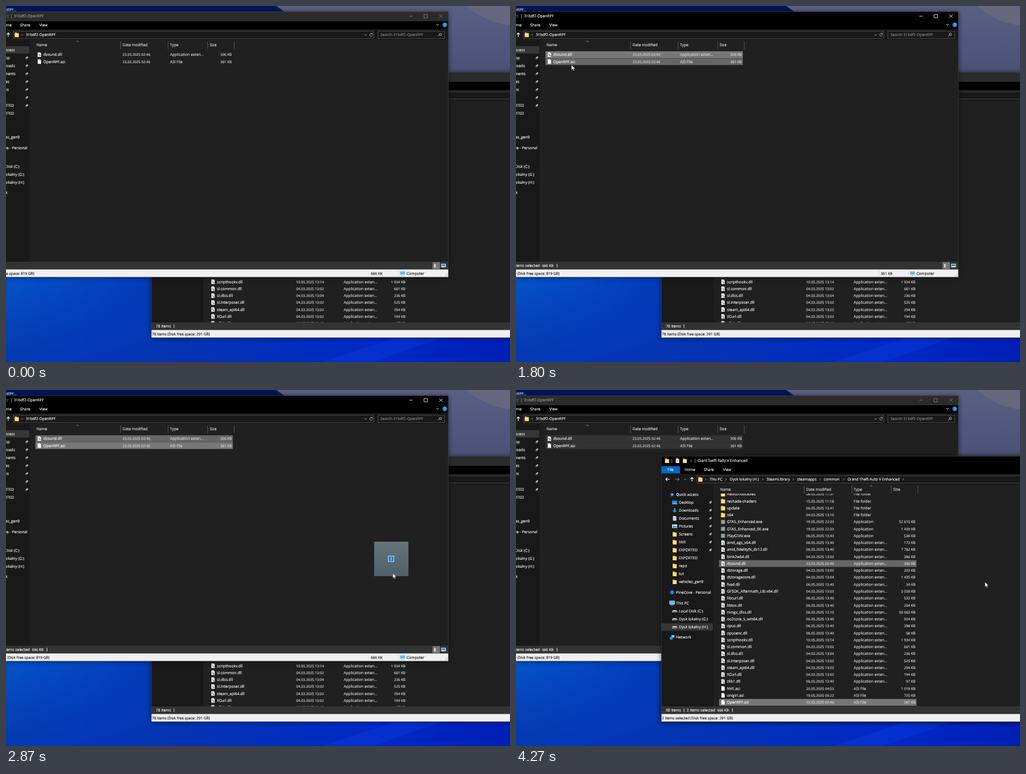
Animation of 891 by 629 pixels, one loop 5670 ms. Source, as an HTML page:

```html
<!DOCTYPE html>
<html lang="en">
<head>
<meta charset="utf-8">
<title>Copying files</title>
<style>
html, body { margin: 0; width: 100%; height: 100%; overflow: hidden; background: #0435b8; }
svg { display: block; width: 891px; height: 629px; font-family: "Open Sans", "Noto Sans", sans-serif; text-rendering: geometricPrecision; }
text { fill: currentColor; stroke: currentColor; stroke-width: .14px; }
</style>
</head>
<body>
<svg id="stage" viewBox="0 0 891 629" xmlns="http://www.w3.org/2000/svg">
  <defs>
    <linearGradient id="sky" x1="0" y1="0" x2="0" y2="1">
      <stop offset="0" stop-color="#00165a"/><stop offset=".5" stop-color="#0338a4"/>
      <stop offset=".77" stop-color="#0452c6"/><stop offset="1" stop-color="#0438ae"/>
    </linearGradient>
    <linearGradient id="deep" x1="0" y1="0" x2="1" y2="0">
      <stop offset="0" stop-color="#0030c0" stop-opacity="0"/><stop offset=".3" stop-color="#0432b0" stop-opacity=".75"/>
      <stop offset=".75" stop-color="#0028c8"/><stop offset="1" stop-color="#001fb4"/>
    </linearGradient>
    <linearGradient id="haze" x1="0" y1="0" x2="0" y2="1">
      <stop offset="0" stop-color="#5a6082"/><stop offset="1" stop-color="#4a5078"/>
    </linearGradient>
    <linearGradient id="glass" x1="0" y1="0" x2="0" y2="1">
      <stop offset="0" stop-color="#6b787c"/><stop offset="1" stop-color="#506471"/>
    </linearGradient>
    <filter id="soft" x="-10%" y="-10%" width="120%" height="120%"><feGaussianBlur stdDeviation="4"/></filter>
    <clipPath id="list"><rect x="349" y="183" width="740" height="376"/></clipPath>
  </defs>
</svg>
<script>
const LOOP = 5670, PITCH = 12.26, TOP = 193;
const stage = document.getElementById('stage');

function add(p, tag, attrs = {}) {
  const n = document.createElementNS('http://www.w3.org/2000/svg', tag);
  for (const k in attrs) n.setAttribute(k, attrs[k]);
  return p.appendChild(n);
}
const group = (p, x = 0, y = 0) => add(p, 'g', { transform: `translate(${x} ${y})` });
const rect = (p, x, y, width, height, fill, more) => add(p, 'rect', { x, y, width, height, fill, ...more });
const line = (p, d, stroke = '#fff', w = .8) => add(p, 'path', { d, fill: 'none', stroke, 'stroke-width': w });
const shape = (p, d, fill) => add(p, 'path', { d, fill });
const dot = (p, cx, cy, r, fill) => add(p, 'circle', { cx, cy, r, fill });
// y is the middle of the text line
function text(p, x, y, s, color = '#fff', size = 6.7, anchor = 'start') {
  const n = add(p, 'text', { x, y: y + 2.3, color, 'font-size': size, 'text-anchor': anchor });
  n.textContent = s;
  return n;
}

// timing: every value holds until the next step
function play(node, steps) {
  const keys = steps.map(([t, v]) => ({ ...v, offset: t / LOOP, easing: 'steps(1, end)' }));
  keys.push({ ...steps[steps.length - 1][1], offset: 1 });
  node.animate(keys, { duration: LOOP, iterations: Infinity });
  return node;
}
function show(node, from, to = LOOP) {
  const steps = [[0, { opacity: from ? 0 : 1 }]];
  if (from) steps.push([from, { opacity: 1 }]);
  if (to < LOOP) steps.push([to, { opacity: 0 }]);
  return play(node, steps);
}
const paint = (node, prop, steps) => play(node, steps.map(([t, c]) => [t, { [prop]: c }]));
const ticks = Array.from({ length: 85 }, (_, i) => Math.round(i * 20 / 3) * 10);
function at(path, t) {
  let i = path.findIndex(p => p[0] > t);
  if (i < 0) return path[path.length - 1].slice(1);
  if (i === 0) return path[0].slice(1);
  const a = path[i - 1], b = path[i];
  let u = (t - a[0]) / (b[0] - a[0]);
  u = u * u * (3 - 2 * u);
  return [a[1] + (b[1] - a[1]) * u, a[2] + (b[2] - a[2]) * u];
}
function follow(node, path) {
  return play(node, ticks.map(t => {
    const [x, y] = at(path, t);
    return [t, { transform: `translate(${x.toFixed(1)}px, ${y.toFixed(1)}px)` }];
  }));
}

// small icons, centred on x, y
const icons = {
  folder(g) { shape(g, 'M-3.5-4H-.5L.3-3H3.5V4H-3.5Z', '#e8b93f'); rect(g, -3.5, -2.4, 7, 6.4, '#ffdc7c'); },
  page(g) { shape(g, 'M-3-4H1.4L3-2.4V4H-3Z', '#f4f4f4'); line(g, 'M1.4-4V-2.4H3', '#999', .5); },
  dll(g) { icons.page(g); dot(g, -.6, -.3, 1.4, '#8799a5'); dot(g, 1, 1.6, 1.2, '#6f808c'); dot(g, -.6, -.3, .5, '#fff'); },
  app(g) { rect(g, -3.5, -3.5, 7, 7, '#93a08c'); },
  star(g) { shape(g, 'M0-4 1.2-1.3 4-1 1.9 .9 2.5 3.8 0 2.3-2.5 3.8-1.9 .9-4-1-1.2-1.3Z', '#3aa0f0'); },
  desk(g) { rect(g, -4.5, -3, 9, 6, '#1f8fee'); rect(g, -4.5, 2, 9, 1, '#8fd0ff'); },
  down(g) { shape(g, 'M-1.3-4H1.3V0H3.8L0 4-3.8 0H-1.3Z', '#2f9bf2'); },
  doc(g) { icons.page(g); line(g, 'M-1.8-1H1.8M-1.8 .6H1.8M-1.8 2.2H1.8', '#3c87c8', .7); },
  pic(g) { rect(g, -4.5, -3, 9, 6.2, '#e9f4fb'); shape(g, 'M-3.8 2.4V0L-1-1 1 .4 3.8-.6V2.4Z', '#2b86c9'); },
  cloud(g) { dot(g, 0, 0, 3.5, '#1588d8'); },
  pc(g) { rect(g, -4.5, -3.8, 9, 6, '#5fbcf5', { stroke: '#c3e2f4', 'stroke-width': .6 }); rect(g, -3, 3, 6, 1, '#b6c7d0'); },
  drive(g) { shape(g, 'M-3.2-1.6H3.2L4.4 .4V2.6H-4.4V.4Z', '#b9bec2'); rect(g, -3.4, .9, 6.8, .9, '#35393c'); },
  net(g) { rect(g, -1, -4, 5, 4.5, '#7cc8f4'); dot(g, -1.4, 1.4, 2.8, '#2d8edc'); }
};
const icon = (p, name, x, y) => icons[name](group(p, x, y));
const pin = (p, x, y) => {
  const g = add(p, 'g', { transform: `translate(${x} ${y}) rotate(45)` });
  shape(g, 'M-1.3-3H1.3V-.2L2.3 1H-2.3L-1.3-.2Z', '#b9b9b9');
  line(g, 'M0 1V3.4', '#b9b9b9', .6);
};
const next = (p, x, y) => line(p, `M${x - 1} ${y - 1.8}L${x + .8} ${y} ${x - 1} ${y + 1.8}`, '#ccc', .7);

// file rows: name|date|size
const files = `BattlEye|11.03 12:50
D3D12-REDIST|04.03 13:10
mods|23.05 10:44
onigiri|23.05 12:20
Redistributables|08.05 11:37
reshade-shaders|15.05 11:18
update|06.05 13:41
x64|04.03 13:10
GTA5_Enhanced.exe|19.05 22:33|52 615
GTA5_Enhanced_BE.exe|19.05 22:33|1 439
PlayGTAV.exe|06.05 13:40|528
amd_ags_x64.dll|06.05 13:40|173
amd_fidelityfx_dx12.dll|06.05 13:40|7 782
bink2w64.dll|04.03 13:02|386
dstorage.dll|04.03 13:02|203
dstoragecore.dll|04.03 13:04|1 435
fvad.dll|06.05 13:40|34
GFSDK_Aftermath_Lib.x64.dll|04.03 13:03|5 028
libcurl.dll|06.05 13:40|533
libtox.dll|06.05 13:40|264
nvngx_dlss.dll|06.03 12:10|50 063
oo2core_5_win64.dll|06.05 13:40|924
opus.dll|06.05 13:40|398
opusenc.dll|06.05 13:40|58
scripthookv.dll|10.05 13:14|1 934
sl.common.dll|04.03 13:02|661
sl.dlss.dll|04.03 13:04|236
sl.interposer.dll|04.03 13:02|525
steam_api64.dll|04.03 13:02|294
XCurl.dll|04.03 13:02|194
zlib1.dll|06.05 13:40|97
NVE.asi|20.05 04:53|1 018
onigiri.asi|19.05 00:22|725`.split('\n');
const added = ['dsound.dll|23.03 02:46|306', 'OpenRPF.asi|23.03 02:46|361'];
const merged = [...files.slice(0, 14), added[0], ...files.slice(14), added[1]];
const kinds = {
  exe: ['app', 'Application'], dll: ['dll', 'Application exten...'],
  asi: ['page', 'ASI File'], dir: ['folder', 'File folder']
};
const rowY = i => TOP + i * PITCH;
const mark = (p, i, fill) => rect(p, 359, rowY(i) - 6, 349, 12, fill);

function rows(p, data) {
  data.forEach((s, i) => {
    const [name, date, size] = s.split('|'), y = rowY(i);
    const ext = (name.match(/\.(exe|dll|asi)$/) || [0, 'dir'])[1];
    icon(p, kinds[ext][0], 366, y);
    text(p, 373, y, name);
    text(p, 513, y, date.replace(' ', '.2025 '), '#dedede', 6.2);
    text(p, 597, y, kinds[ext][1], '#dedede');
    if (size) text(p, 706, y, size + ' KB', '#dedede', 6.2, 'end');
  });
}

const places = [
  ['star', 'Quick access', 184.5],
  ...[['desk', 'Desktop'], ['down', 'Downloads'], ['doc', 'Documents'], ['pic', 'Pictures'],
    ['folder', 'Screens'], ['folder', 'NVE'], ['folder', 'EXPORTED'], ['folder', 'EXPORTED'],
    ['folder', 'repo'], ['folder', 'tut'], ['folder', 'vehicles_gen9']
  ].map(([k, s], i) => [k, s, 198.6 + 14.03 * i, 1, i < 7]),
  ['cloud', 'PineCove - Personal', 357.5], ['pc', 'This PC', 376.5],
  ['drive', 'Local Disk (C:)', 390.5, 1], ['drive', 'Dysk lokalny (G:)', 404.5, 1],
  ['drive', 'Dysk lokalny (H:)', 418.7, 1], ['net', 'Network', 437]
];

// one window; look lists [time, active]
function explorer(o) {
  const g = group(stage, o.x, o.y);
  const tint = (n, prop, on, off) => paint(n, prop, o.look.map(([t, a]) => [t, a ? on : off]));
  rect(g, 257, 118, 832, 468, '#000', { filter: 'url(#soft)', opacity: .6 });
  rect(g, 257, 117, 832, 469, '#191919');
  tint(rect(g, 257, 117, 832, 17, '#000'), 'fill', '#000', '#2b2b2b');
  rect(g, 257, 134, 832, 14, '#000');
  rect(g, 349, 167, 740, 392, '#202020');

  icon(g, 'folder', 267, 125);
  icon(g, 'page', 285.5, 125);
  line(g, 'M283.8 125.2L285.2 126.7 287.6 123.5', '#c33', .8);
  icon(g, 'folder', 298.5, 125);
  tint(line(g, 'M275.5 122V129M316.5 121.5V129M307.5 124H311.5M308 126L309.5 127.4 311 126', '#aaa', .7), 'stroke', '#bbb', '#888');
  tint(text(g, 321, 125, o.title), 'color', '#fff', '#a0a0a0');
  tint(line(g, 'M1020 125H1026M1046 122H1052V128H1046ZM1073 122L1079 128M1079 122L1073 128'), 'stroke', '#fff', '#858585');

  rect(g, 257, 134.5, 33, 13, '#0067c0');
  [['File', 268], ['Home', 298], ['Share', 332], ['View', 366]].forEach(([s, x]) => text(g, x, 141, s));
  line(g, 'M1068 139L1070 141.3 1072 139', '#ddd', 1);
  dot(g, 1082.7, 140.3, 4.2, '#0a84e0');
  text(g, 1082.7, 140.3, '?', '#fff', 6.4, 'middle');

  line(g, 'M271.5 157.8H264.8M267.5 155L264.8 157.8 267.5 160.6', '#fff', 1.1);
  line(g, 'M282 157.8H288.7M286 155L288.7 157.8 286 160.6', '#888', 1);
  line(g, 'M297.5 157L299 158.6 300.5 157', '#ccc', .8);
  line(g, 'M311 161.4V154.6M308.3 157.4L311 154.6 313.7 157.4', '#fff', 1.1);
  const box = { stroke: '#505050', 'stroke-width': .8 };
  rect(g, 320, 151.5, 637, 13, '#191919', box);
  rect(g, 964.5, 151.5, 118, 13, '#191919', box);
  icon(g, 'folder', 326, 157.8);
  next(g, 335.5, 157.8);
  o.crumbs.forEach(([s, x, sep]) => {
    text(g, x, 157.8, s);
    if (sep) next(g, sep, 157.8);
  });
  line(g, 'M940.5 157L942.5 159.2 944.5 157', '#ccc', .8);
  line(g, 'M954.6 156.4A2.5 2.5 0 1 0 954.9 158.6M954.8 154.6V156.6H952.8', '#ccc', .8);
  text(g, 969, 157.8, 'Search ' + o.title, '#8a8a8a');
  line(g, 'M1071 160.5L1073.3 158.2M1073 157.2A2 2 0 1 0 1077 157.2 2 2 0 1 0 1073 157.2', '#ddd', .8);

  places.forEach(([k, s, y, deep, pinned], i) => {
    if (i === o.nav) rect(g, 257, y - 6.5, 91, 13, '#363636');
    icon(g, k, deep ? 280.5 : 276, y);
    text(g, deep ? 288 : 283, y, s);
    if (pinned) pin(g, 343.5, y + .3);
  });

  [['Name', 361], ['Date modified', 513], ['Type', 597], ['Size', 667]].forEach(([s, x]) => text(g, x, 176, s, '#e4e4e4'));
  line(g, 'M509.5 169V183M593.5 169V183M663.5 169V183M710.5 169V183', '#636363', .8);
  line(g, `M${o.sort - 2} 170.3L${o.sort} 168.6 ${o.sort + 2} 170.3`, '#bbb', .7);

  rect(g, 257, 559, 832, 14, '#333');
  rect(g, 257, 572.5, 832, 13.5, '#f1f0f1');
  rect(g, 1061, 559.5, 13, 13, '#777');
  line(g, 'M1064.5 563V569M1066 563V569', '#fff', 1);
  rect(g, 1076.5, 562.5, 8, 6, '#fff');
  rect(g, 1077.5, 563.5, 6, 3.2, '#1679c4');
  line(g, 'M948.5 574V585M1000.5 574V585', '#d4d4d4', .7);
  icon(g, 'pc', 1008, 579.7);
  text(g, 1015, 579.7, 'Computer', '#111');
  line(g, 'M1083 584.5L1087.5 580M1085.5 584.5L1087.5 582.5', '#999', .7);
  rect(g, 257, 117, 832, 469, 'none', { stroke: '#4a4a4a', 'stroke-width': .6 });
  return { g, list: add(g, 'g', { 'clip-path': 'url(#list)' }) };
}

// grey bar; shift moves the pieces left for shorter words
function counts(p, n, picked, kb, shift = 0) {
  const g = group(p), first = Math.min(shift, 3);
  text(g, 265, 565.7, n + ' items');
  line(g, `M${297 - first} 562.5V569`);
  if (picked) {
    text(g, 352 - shift, 565.7, picked + ' selected', '#fff', 6.7, 'end');
    text(g, 356 - shift, 565.7, kb + ' KB', '#fff', 6.2);
    line(g, `M${382.5 - shift} 562.5V569`);
  }
  return g;
}

// desktop
rect(stage, 0, 0, 891, 629, 'url(#sky)');
rect(stage, 0, 470, 891, 159, 'url(#deep)');
shape(stage, 'M0 629L257 520V586L120 629Z', 'rgba(8,62,190,.3)');
shape(stage, 'M560 629L690 586H770L650 629Z', 'rgba(20,80,240,.2)');
shape(stage, 'M478 0H891V120H770V10H492Z', 'url(#haze)');
shape(stage, 'M815 0H891V34Q850 30 815 0Z', '#66677f');
text(stage, -2, 7, 'nRPF...');

const folder = [
  ['This PC', 342, 371.5], ['Dysk lokalny (H:)', 378, 436.5], ['SteamLibrary', 443, 490.5],
  ['steamapps', 497, 537.5], ['common', 544, 579.5], ['Grand Theft Auto V Enhanced', 586]
];
const game = { x: 0, y: 0, title: 'Giant Swift Rally V Enhanced', crumbs: folder, nav: 16, sort: 628 };
const free = '(Disk free space: 291 GB)';
const note = (p, s) => text(p, 258, 579.7, s, '#111', 6.5);

// game folder, behind
const back = explorer({ ...game, look: [[0, 0]] });
rows(back.list, files);
counts(back.g, 78);
note(back.g, '78 items ' + free);

// mod folder
const mod = explorer({
  x: -307, y: -107, title: '31bdf2-OpenRPF', crumbs: [['31bdf2-OpenRPF', 342]],
  nav: 0, sort: 433, look: [[0, 0], [870, 1], [3730, 0]]
});
paint(mark(mod.list, 0, 'none'), 'fill', [[0, 'transparent'], [1330, '#777'], [2000, '#666'], [3730, '#333']]);
paint(mark(mod.list, 1, 'none'), 'fill', [[0, 'transparent'], [1130, '#666'], [2000, '#777'], [3730, '#333']]);
rows(mod.list, added);
show(counts(mod.g, 2, '', '', 3), 0, 1130);
show(counts(mod.g, 2, '1 item', 361, 6), 1130, 1400);
show(counts(mod.g, 2, '2 items', 666, 3), 1400);
const modNote = (end, s, from, to) => show(text(mod.g, end, 579.7, s, '#111', 6.5, 'end'), from, to);
modNote(357, '2 items (Disk free space: 819 GB)', 0, 1130);
modNote(437.5, 'Type: ASI File, Size: 361 KB, Date modified: 23.03.2025 02:46', 1130, 1400);
modNote(384, '2 items selected (Disk free space: 819 GB)', 1400);
const total = (n, from, to) => show(text(mod.g, 952, 579.7, n + ' KB', '#111', 6.3), from, to);
total(666, 0, 1130);
total(361, 1130, 1930);
total(666, 1930);

// game folder, in front after the drop
const front = explorer({ ...game, look: [[0, 1]] });
show(front.g, 3730);
const before = show(group(front.list), 0, 3800);
rect(before, 359.4, rowY(0) - 6, 348.4, 12, 'none', { stroke: '#777', 'stroke-width': .8 });
rows(before, files);
const after = show(group(front.list), 3800);
play(after, [[0, { transform: 'translate(0px, 0px)' }], [4000, { transform: 'translate(0px, -58px)' }]]);
show(mark(after, 14, '#666'), 4000);
show(mark(after, 34, '#777'), 4000);
rows(after, merged);
show(counts(front.g, 78), 0, 4070);
show(counts(front.g, 80, '2 items', 666), 4070);
show(note(front.g, '78 items ' + free), 0, 4130);
show(note(front.g, '2 items selected ' + free), 4130);
show(next(front.g, 684.5, 157.8), 4270);

// pointer, rubber band and dragged pair
const track = [
  [200, 0, 619], [730, 92, 146], [870, 104, 124], [930, 104, 124], [1200, 83.5, 97.5], [1400, 80, 84],
  [1600, 80, 84], [1800, 98, 104], [2000, 98, 107], [2130, 105, 111], [2530, 508, 295],
  [2600, 532, 307], [3130, 827, 339], [3200, 829, 339]
];
const cargo = [[2130, 70, 55], [2530, 473, 239], [2600, 497, 251], [3130, 796, 284], [3200, 798, 284]];

const band = rect(stage, 0, 0, 0, 0, 'rgba(25,95,205,.42)', { stroke: '#2d62a8', 'stroke-width': .8 });
play(band, ticks.map(t => {
  const [x, y] = at(track, t);
  return [t, { x: x + 'px', y: y + 'px', width: Math.max(0, 104 - x) + 'px', height: Math.max(0, 124 - y) + 'px' }];
}));
show(band, 930, 1600);

const pair = show(group(stage), 2130, 3730);
follow(pair, cargo);
rect(pair, 0, 0, 61, 61, 'url(#glass)', { rx: 1, opacity: .95 });
rect(pair, 25.3, 25.5, 9.6, 9.6, '#0a74d2', { stroke: '#fff', 'stroke-width': .9 });
text(pair, 30.1, 30.4, '2', '#fff', 7, 'middle');

const pointer = show(group(stage), 200);
follow(pointer, track);
const tip = show(group(pointer, 6, 7), 3000, 3730);
rect(tip, 0, 0, 130, 12, '#fff', { stroke: '#aaa', 'stroke-width': .5 });
line(tip, 'M2.8 6H8.2M5.5 3.3V8.7', '#1550c0', 1.4);
text(tip, 11, 6, 'Copy to', '#2545b8');
text(tip, 37.5, 6, game.title, '#101c60');
add(pointer, 'path', {
  d: 'M0 0V9.2L2.1 7.3 3.5 10.5 5 9.9 3.6 6.8H6.4Z', fill: '#fff', stroke: '#000', 'stroke-width': .5
});
</script>
</body>
</html>
```
